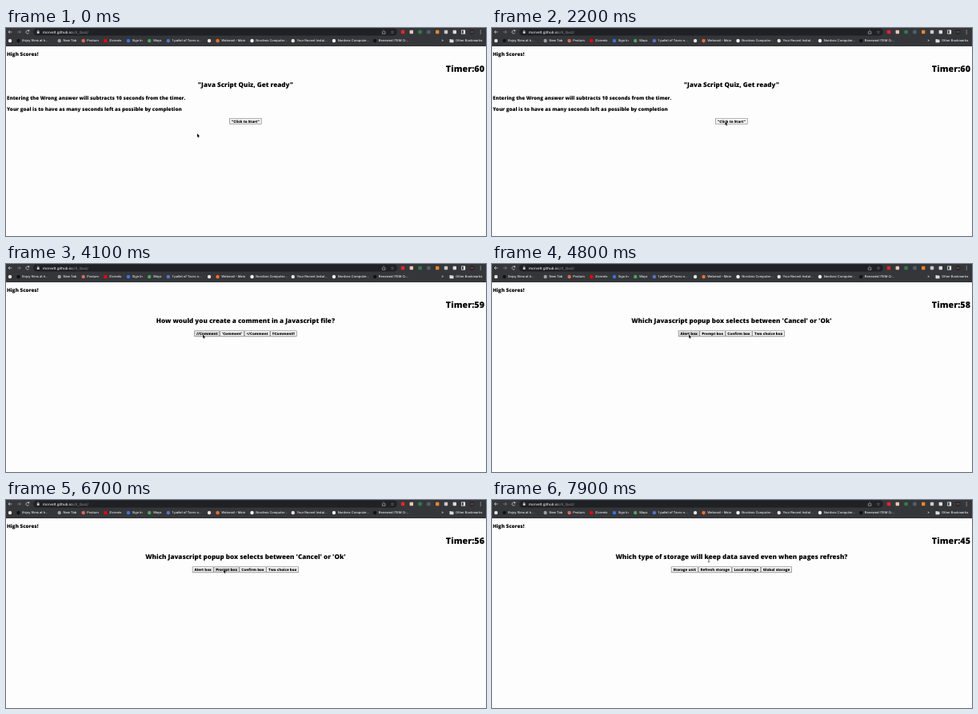
An HTML page with a canvas that plays this animation: 600x261 px, repeating every 8000 ms.

```html
<!DOCTYPE html>
<html lang="en">
<head>
<meta charset="utf-8">
<title>Quiz</title>
<style>
html, body { margin: 0; width: 100%; height: 100%; overflow: hidden; background: #fdfdfd; }
canvas { display: block; width: 600px; height: 261px; }
</style>
</head>
<body>
<canvas id="stage"></canvas>
<script>
const W = 600, H = 261, LOOP = 8000, STEP = 100;
const ZOOM = 0.3375; // stage pixels per page pixel
const H1 = 32 * ZOOM, H2 = 24 * ZOOM, H3 = 18.72 * ZOOM, SMALL = 13.33 * ZOOM;
const PAGE = '"Open Sans", sans-serif', UI = 'Inter, sans-serif';
const LIGHT = '#dadce0', BAR = '#35363a';

const canvas = document.getElementById('stage');
const ctx = canvas.getContext('2d');
const dpr = window.devicePixelRatio || 1;
canvas.width = W * dpr;
canvas.height = H * dpr;

const screens = [
  { from: 0, title: '"Java Script Quiz, Get ready"', labels: ['"Click to Start"'],
    intro: ['Entering the Wrong answer will subtracts 10 seconds from the timer.',
      'Your goal is to have as many seconds left as possible by completion'] },
  { from: 2300, title: 'How would you create a comment in a Javascript file?',
    labels: ['//Comment', "'Comment'", '</Comment', '!!Comment!!'] },
  { from: 4700, title: "Which Javascript popup box selects between 'Cancel' or 'Ok'",
    labels: ['Alert box', 'Prompt box', 'Confirm box', 'Two choice box'] },
  { from: 6900, title: 'Which type of storage will keep data saved even when pages refresh?',
    labels: ['Storage unit', 'Refresh storage', 'Local storage', 'Global storage'] }
];

const moves = [
  { from: 99, to: 100, x: 145, y: 27 },
  { from: 200, to: 900, x: 100, y: 8 },
  { from: 1000, to: 1900, x: 291.5, y: 117.5 },
  { from: 3600, to: 4100, x: 246, y: 88.5 },
  { from: 5200, to: 5700, x: 254, y: 78 },
  { from: 5800, to: 6400, x: 272, y: 87 },
  { from: 7000, to: 7900, x: 271, y: 75 }
];

const bookmarks = [
  ['#e8e3da'], ['#111', 'Enjoy films at h...'], ['#9aa0a6', 'New Tab'], ['#d96b5c', 'Postum'],
  ['#f00', 'Zivreelo'], ['#3b74e8', 'Sign In'], ['#4ba65a', 'Ways'], ['#5874c4', '1 pallet of Tavro n...'],
  ['#e8e3da'], ['#f2702c', 'Webmail - Main'], ['#f4f4f4', 'Nordvex Computer...'],
  ['#e8e3da', 'Your Recent Instal...'], ['#f4f4f4', 'Nordvex Computer...'], ['#111', 'Renewed ITEM Cr...']
];

const extensions = ['#e5262b', '#e9c9b4', '#2f7e4b', '#53606b', '#e8862e', '#c9c9c9', LIGHT];

function setFont(size, weight, family) {
  ctx.font = `${weight} ${size}px ${family}`;
  ctx.textRendering = 'geometricPrecision';
}

function text(str, x, y, size, { weight = 800, color = '#000', align = 'left', family = PAGE } = {}) {
  setFont(size, weight, family);
  ctx.fillStyle = color;
  ctx.textAlign = align;
  ctx.fillText(str, x, y);
  return ctx.measureText(str).width;
}

function uiText(str, x, y, size = 4, color = '#e8eaed', align = 'left') {
  return text(str, x, y, size, { weight: 500, color, align, family: UI });
}

function box(x, y, w, h, color, r = 0) {
  ctx.fillStyle = color;
  ctx.beginPath();
  ctx.roundRect(x, y, w, h, r);
  ctx.fill();
}

function dot(x, y, r, color) {
  box(x - r, y - r, r * 2, r * 2, color, r);
}

function line(points, color = LIGHT, width = 0.7) {
  ctx.strokeStyle = color;
  ctx.lineWidth = width;
  ctx.beginPath();
  points.forEach(([x, y]) => ctx.lineTo(x, y));
  ctx.stroke();
}

function navArrow(x, dir, color) {
  line([[x - 2.2 * dir, 5], [x + 2.2 * dir, 5]], color);
  line([[x + 0.2 * dir, 3], [x + 2.2 * dir, 5], [x + 0.2 * dir, 7]], color);
}

function pointerAt(t) {
  let x = 239, y = 132.5;
  for (const m of moves) {
    const k = Math.min(1, Math.max(0, (t - m.from) / (m.to - m.from)));
    const e = k * k * (3 - 2 * k);
    x += (m.x - x) * e;
    y += (m.y - y) * e;
  }
  return [x, y];
}

// One second per tick; the wrong answer costs ten more from the fifth tick on.
function secondsLeft(t) {
  const ticks = Math.max(0, Math.floor((t - screens[1].from) / 1000));
  return 60 - ticks - (ticks >= 5 ? 10 : 0);
}

function drawAddressRow() {
  box(34, 0.5, 455, 9, '#202124', 4.5);
  navArrow(5.2, -1, LIGHT);
  navArrow(16.2, 1, '#85878a');
  ctx.strokeStyle = LIGHT;
  ctx.beginPath();
  ctx.arc(27, 5, 2, 0.5, 5.6);
  ctx.stroke();
  box(27.6, 2.6, 1.6, 1.6, LIGHT);

  box(38.8, 4.4, 2.8, 2.4, LIGHT);
  line([[39.4, 4.4], [39.4, 3.2], [41, 3.2], [41, 4.4]], LIGHT, 0.5);
  const host = uiText('morvelt.github.io', 46, 6.6, 4.5);
  uiText('/JS_Quiz/', 46 + host, 6.6, 4.5, '#85888c');

  line([[471, 4.5], [470.3, 4.5], [470.3, 7.3], [474, 7.3], [474, 4.5], [473.3, 4.5]], LIGHT, 0.5);
  line([[472.15, 5.6], [472.15, 2.2]], LIGHT, 0.5);
  text('☆', 483, 6.8, 5.5, { weight: 400, color: LIGHT, align: 'center', family: '"DejaVu Sans", sans-serif' });

  const slot = i => 496 + 10.8 * i;
  extensions.forEach((color, i) => box(slot(i) - 2.2, 2.8, 4.4, 4.4, color, 0.8));
  box(slot(7) - 2.5, 2.5, 5, 5, '#f1f3f4', 0.5);
  box(slot(7) - 1.8, 3.2, 2, 3.6, BAR);
  dot(slot(8), 5, 3, '#26272b');
  box(slot(8) - 2, 4.5, 4, 1, '#b0524a');
  for (let y = 3; y <= 7; y += 2) dot(slot(9), y, 0.55, LIGHT);
}

// Shortened labels fill the widest slot; others take the room they need.
function drawBookmarks() {
  let x = 5;
  for (const [color, label = ''] of bookmarks) {
    dot(x, 16, 2.2, color);
    const w = uiText(label, x + 4.7, 17.4);
    x += label.endsWith('...') ? 51.2 : label ? w + 13.2 : 10.5;
  }
  uiText('»', 545.5, 17.4, 4.5, LIGHT, 'center');
  box(554.5, 14, 2.2, 1.2, LIGHT, 0.4);
  box(554.5, 14.6, 5, 3.6, LIGHT, 0.5);
  uiText('Other Bookmarks', 562, 17.4);
}

function drawButtons(labels, y, px, py, pressed) {
  const h = 7.8, pad = 8 * ZOOM;
  setFont(SMALL, 800, PAGE);
  const widths = labels.map(s => ctx.measureText(s).width + pad * 2);
  let x = 299.4 - widths.reduce((a, b) => a + b) / 2;
  labels.forEach((label, i) => {
    const w = widths[i];
    const hover = px >= x && px < x + w && py >= y && py < y + h;
    const fill = !hover ? '#efefef' : pressed ? '#f5f5f5' : '#dedede';
    box(x, y, w, h, '#767676', 0.8);
    box(x + 0.6, y + 0.6, w - 1.2, h - 1.2, fill, 0.4);
    text(label, x + pad, y + 5.5, SMALL);
    x += w;
  });
}

function drawArrow(x, y) {
  const shape = [[0, 0], [0, 4.4], [1, 3.6], [1.7, 5.2], [2.5, 4.8], [1.8, 3.3], [3.1, 3.2]];
  ctx.beginPath();
  shape.forEach(([dx, dy]) => ctx.lineTo(x + dx, y + dy));
  ctx.closePath();
  ctx.strokeStyle = '#fff';
  ctx.lineWidth = 0.7;
  ctx.stroke();
  ctx.fillStyle = '#000';
  ctx.fill();
}

function drawBeam(x, y, color) {
  line([[x, y - 2.5], [x, y + 2.5]], color);
  for (const end of [y - 2.8, y + 2.8]) line([[x - 1.2, end], [x + 1.2, end]], color, 0.6);
}

function draw(t) {
  const index = screens.findLastIndex(s => s.from <= t);
  const { title, labels, intro } = screens[index];
  const next = screens[index + 1];
  const pressed = next && t >= next.from - STEP;
  const [px, py] = pointerAt(t);

  ctx.setTransform(dpr, 0, 0, dpr, 0, 0);
  box(0, 0, W, H, '#fdfdfd');
  box(0, 0, W, 23, BAR);
  drawAddressRow();
  drawBookmarks();

  text('High Scores!', 1, 34.6, H3);
  text('Timer:' + secondsLeft(t), 598, 55, H1, { align: 'right' });
  text(title, 299.4, 74, H2, { align: 'center' });
  if (intro) intro.forEach((s, i) => text(s, 1, 89.6 + 14.8 * i, H3));
  drawButtons(labels, intro ? 113 : 83.4, px, py, pressed);

  const inAddress = py < 10;
  const onTitle = py > 66 && py < 77;
  if (inAddress || onTitle) drawBeam(px, py, inAddress ? '#e8eaed' : '#222');
  else drawArrow(px, py);
}

const start = performance.now();
function frame() {
  const t = (performance.now() - start) % LOOP;
  draw(Math.floor(t / STEP) * STEP);
  requestAnimationFrame(frame);
}
frame();
</script>
</body>
</html>
```
